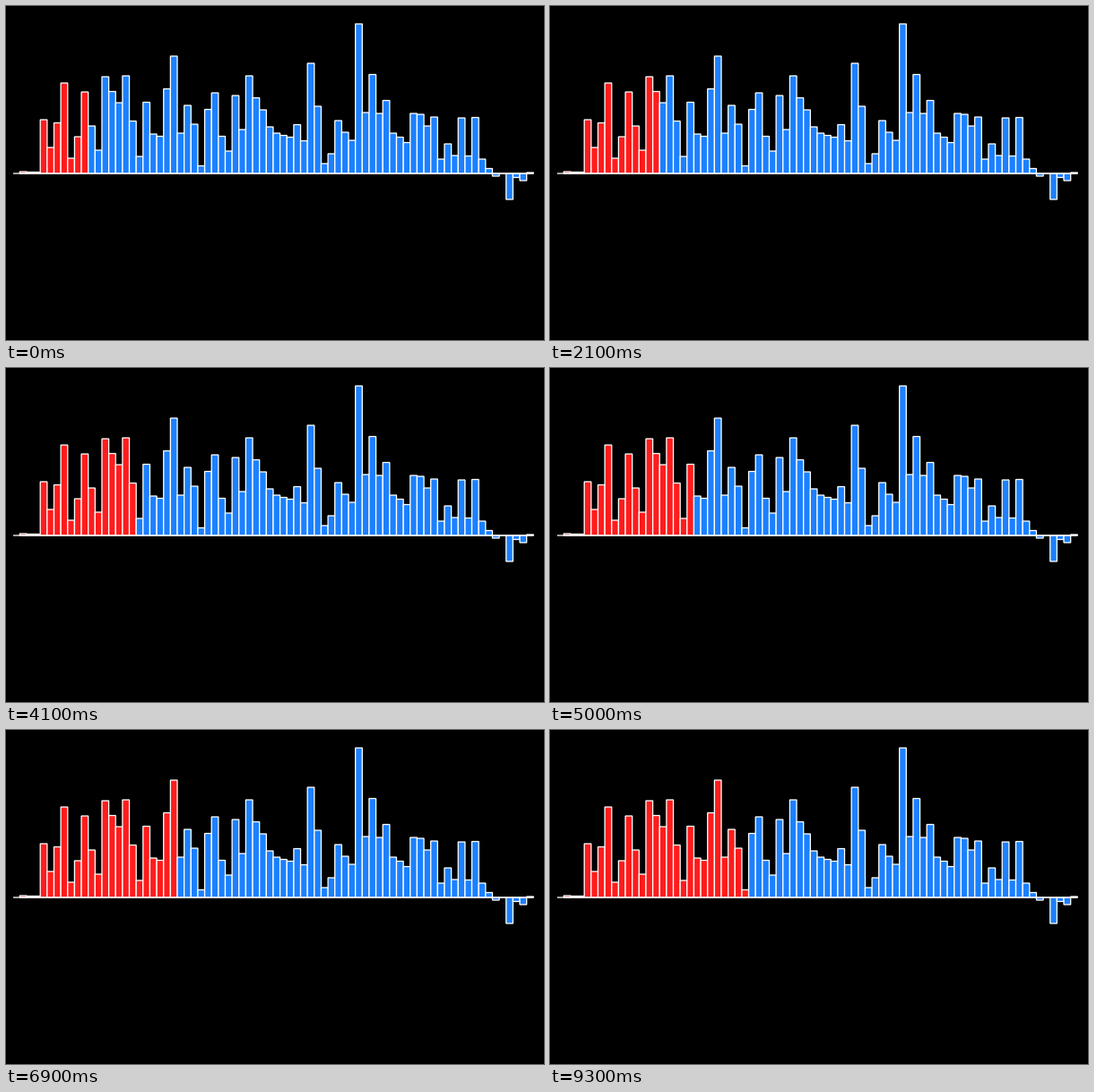
A matplotlib script that plays this animation: 600 px wide and 373 px high, repeating every 9400 ms.

```python
import math

import matplotlib.pyplot as plt
from matplotlib.animation import FuncAnimation
from matplotlib.patches import Rectangle

WIDTH, HEIGHT, DPI = 600, 373, 100
FRAMES, INTERVAL = 94, 100
BASELINE = 187
LEFT, BAR_WIDTH = 15.3, 7.64
LINE_WIDTH = 1.3 * 72 / DPI
RED, BLUE = "#ff1c1c", "#1c80ff"
FRAMES_PER_BAR = 5.47

# Signed bar heights in pixels above the baseline.
HEIGHTS = [
    2, 1.5, 1.5, 60, 29, 56.5, 101, 17, 41, 91, 53, 26, 108, 91.5, 79,
    109, 58.5, 19, 79.5, 44, 41.5, 94.5, 131, 45, 76, 55, 8.5, 71.5, 90, 41.5,
    25, 87, 49, 109, 84.5, 71, 52, 45, 42.5, 40.5, 54.5, 36.5, 123, 75, 11,
    22, 59, 46, 37, 167, 68, 110.5, 67, 81.5, 45, 40.5, 34.5, 67, 66, 53,
    63, 16, 33, 20, 62, 19.5, 62.5, 16, 5.5, -3, 0, -29, -4.5, -8, 1,
]

fig = plt.figure(figsize=(WIDTH / DPI, HEIGHT / DPI), dpi=DPI, facecolor="black")
ax = fig.add_axes([0, 0, 1, 1])
ax.set_xlim(0, WIDTH)
ax.set_ylim(HEIGHT, 0)
ax.axis("off")

bars = [
    ax.add_patch(Rectangle(
        (LEFT + i * BAR_WIDTH, BASELINE), BAR_WIDTH, -height,
        facecolor=BLUE, edgecolor="white", linewidth=LINE_WIDTH, snap=False,
    ))
    for i, height in enumerate(HEIGHTS)
]
ax.plot([8, 588.3], [BASELINE, BASELINE], color="white", linewidth=LINE_WIDTH,
        solid_capstyle="butt", snap=False, zorder=3)


def red_count(frame):
    return 12 + math.floor((frame - 8.8) / FRAMES_PER_BAR)


def update(frame):
    count = red_count(frame)
    for i, bar in enumerate(bars):
        bar.set_facecolor(RED if i < count else BLUE)
    return bars


animation = FuncAnimation(fig, update, frames=FRAMES, interval=INTERVAL,
                          repeat=True, repeat_delay=0, blit=False)
plt.show()
```
